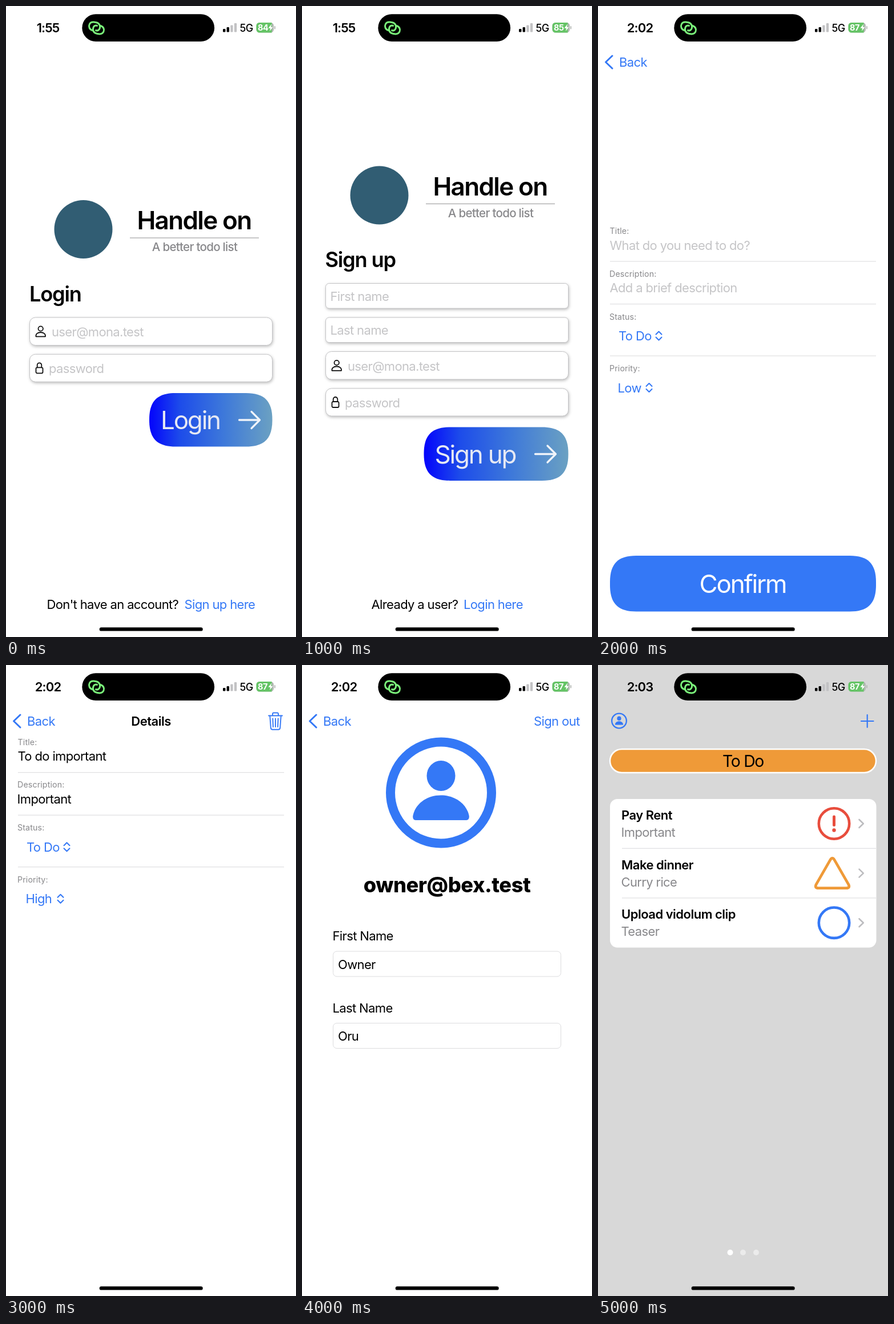
These frames come from a looping animation (508 px wide and 1102 px high, 6 s). An HTML page:

```html
<!DOCTYPE html>
<html lang="en">
<head>
<meta charset="utf-8">
<title>Todo app tour</title>
<style>
  html, body { margin: 0; width: 100%; height: 100%; overflow: hidden; background: #fff; }
  svg { display: block; width: 508px; height: 1102px; }
  text {
    font-family: Inter, "Liberation Sans", sans-serif;
    font-size: 22px; letter-spacing: -.029em; font-optical-sizing: none; white-space: pre;
  }
  .mid { text-anchor: middle; }
  .end { text-anchor: end; }
  .semi { font-weight: 600; letter-spacing: -.023em; }
  .time { font-weight: 600; letter-spacing: -.04em; }
  .brand { font-size: 44px; font-weight: 600; letter-spacing: -.037em; }
  .tag { font-size: 20.5px; font-weight: 500; letter-spacing: -.034em; }
  .head { font-size: 36.2px; font-weight: 600; letter-spacing: -.033em; }
  .mail { font-size: 36.2px; font-weight: 800; letter-spacing: -.012em; }
  .big { font-size: 44px; letter-spacing: -.05em; }
  .pill { font-size: 28.4px; letter-spacing: -.045em; }
  .label { font-size: 14.2px; letter-spacing: .01em; }
  .net { font-size: 18px; font-weight: 500; }
  .charge { font-size: 14.5px; font-weight: 700; }
  .blue { fill: #3478f6; }
  .gray { fill: #88888b; }
  .hint { fill: #c5c5c7; }
  .white { fill: #fff; }
  .pale { fill: #e6e9f4; }
  .line { fill: none; stroke-linecap: round; stroke-linejoin: round; }
  .raised { filter: drop-shadow(1px 2.5px 2.5px rgba(0, 0, 0, .26)); }
  .scene { visibility: hidden; animation: show 6s step-end infinite; }
  @keyframes show {
    0% { visibility: visible; }
    16.666%, 100% { visibility: hidden; }
  }
</style>
</head>
<body>
<svg id="stage" viewBox="0 0 508 1102">
  <defs>
    <linearGradient id="sea">
      <stop offset="0" stop-color="#0303fc"/>
      <stop offset=".25" stop-color="#1d4cea"/>
      <stop offset=".6" stop-color="#3d78da"/>
      <stop offset="1" stop-color="#6ba1c2"/>
    </linearGradient>
    <g id="person">
      <ellipse cy="-29.5" rx="25" ry="26.5"/>
      <path d="M-44.500 48C-48.500 48-50 44-49 39.500C-45.500 22-27.500 4.500 0 4.500S45.500 22 49 39.500C50 44 48.500 48 44.500 48Z"/>
    </g>
  </defs>
</svg>
<script>
const BLUE = '#3478f6', ORANGE = '#ef9a38', RED = '#e84d3d', RULE = '#dfdfe1';

const text = (x, y, s, cls = '') => `<text x="${x}" y="${y}" class="${cls}">${s}</text>`;
const rect = (x, y, w, h, r, fill, more = '') =>
  `<rect x="${x}" y="${y}" width="${w}" height="${h}" rx="${r}" fill="${fill}" ${more}/>`;
const dot = (x, y, r, fill, more = '') => `<circle cx="${x}" cy="${y}" r="${r}" fill="${fill}" ${more}/>`;
const line = (d, color, w) => `<path class="line" d="${d}" stroke="${color}" stroke-width="${w}"/>`;
const rule = (x, y) => rect(x, y - .6, 487 - x, 1.2, 0, RULE);
const at = (x, y, s) => `<g transform="translate(${x} ${y})">${s}</g>`;

// Rounded box with continuous corners
function squircle(x, y, w, h, fill, e = 46, c = 14) {
  const d = `M${x + e} ${y}h${w - 2 * e}c${e - c} 0 ${e} ${c} ${e} ${e}v${h - 2 * e}` +
    `c0 ${e - c} ${-c} ${e} ${-e} ${e}h${2 * e - w}c${c - e} 0 ${-e} ${-c} ${-e} ${-e}v${2 * e - h}` +
    `c0 ${c - e} ${c} ${-e} ${e} ${-e}Z`;
  return `<path d="${d}" fill="${fill}"/>`;
}

function statusBar(time, charge) {
  const link = 'M151.500 42.500C146 41 144.500 36 146 32.500C147.500 28.500 152 27.500 157 28.500' +
    'C163 29.500 166 34 164 39.500C163 42.500 160 43.500 157.500 42.500';
  const loop = line(link, '#7bf27b', 3);
  const bars = [5.5, 8.5, 12, 15.5].map((h, i) =>
    rect(380 + i * 6.6, 45.5 - h, 4.4, h, 1.2, i < 2 ? '#000' : '#c2c2c4')).join('');
  return rect(133.3, 14.3, 231.8, 47.7, 23.85, '#000') +
    loop + `<g transform="rotate(180 158.500 38.500)">${loop}</g>` +
    text(73.5, 45.5, time, 'mid time') + bars + text(409.5, 45, '5G', 'net') +
    rect(438.5, 29, 30.5, 17.5, 5.5, '#b4b8b4') +
    `<path d="M444 29H465.500V46.500H444A5.500 5.500 0 0 1 438.500 41V34.500A5.500 5.500 0 0 1 444 29Z" fill="#65c466"/>` +
    rect(470, 35, 1.8, 5.5, .9, '#b4b8b4') +
    text(441, 43, charge, 'charge white') +
    '<path d="M465 31.500L459.500 38.700H463L462 44L467.500 36.700H464Z" fill="#fff"/>';
}

const homeBar = rect(163.7, 1085.2, 181, 6.4, 3.2, '#000');

const logo = y => dot(135.5, y, 51, '#315d73') +
  text(329.5, y, 'Handle on', 'brand mid') +
  rect(217, y + 14.4, 226, 1.2, 0, '#a2a2a4') +
  text(330.5, y + 38, 'A better todo list', 'tag gray mid');

const field = (y, h, r) => rect(41.5, y, 425, h, r, '#fff', 'class="raised" stroke="#c4c4c6"');

const userField = y => field(y, 48.5, 10) +
  at(60.7, y + 24.5, line('M-8.200 8.800C-9 4 -5 1.500 0 1.500S9 4 8.200 8.800Z', '#111', 1.8) +
    dot(0, -5, 4.2, 'none', 'stroke="#111" stroke-width="1.800"')) +
  text(80, y + 33, 'user@mona.test', 'hint');

const passField = y => field(y, 48, 10) +
  at(58.5, y + 24, line('M-3.800-1V-5A3.800 4 0 0 1 3.800-5V-1', '#111', 1.8) +
    rect(-6, -1, 12, 10, 2, 'none', 'stroke="#111" stroke-width="1.800"')) +
  text(75, y + 32.5, 'password', 'hint');

const nameField = (y, hint) => field(y, 43.5, 6) + text(49.5, y + 30, hint, 'hint');

const goButton = (x, y, label, tx) => squircle(x, y, 466.5 - x, 93.5, 'url(#sea)') +
  text(tx, y + 63, label, 'big pale') +
  line(`M408.500 ${y + 47}H444.500M430 ${y + 32.5}L444.500 ${y + 47}L430 ${y + 61.5}`, '#f0f4fa', 3.3);

const back = line('M25 87L13.500 98L25 109', BLUE, 3) + text(37, 105.5, 'Back', 'blue');

const picker = (x, y, label, cx) => text(x, y, label, 'blue') +
  line(`M${cx - 5} ${y - 10.5}l5-5l5 5m0 5l-5 5l-5-5`, BLUE, 2);

const form = (y, title, note, cls, level, cx) => at(0, y,
  text(20.5, 0, 'Title:', 'label gray') + text(20.5, 27.5, title, cls) + rule(21, 48) +
  text(20, 74.5, 'Description:', 'label gray') + text(cls ? 20.5 : 19.5, 102, note, cls) + rule(21, 122.5) +
  text(20, 149.5, 'Status:', 'label gray') + picker(36, 186, 'To Do', 106.5) + rule(21, 213) +
  text(20, 240, 'Priority:', 'label gray') + picker(34.5, 276.5, level, cx));

const trash = line('M460 88.500H484M467 88V85.500Q467 83.500 469 83.500H475Q477 83.500 477 85.500V88' +
  'M462.300 89L463.800 109.500Q464 112.800 467 112.800H477Q480 112.800 480.200 109.500L481.700 89' +
  'M467.300 93.500L467.900 108M472 93.500V108M476.700 93.500L476.100 108', BLUE, 1.9);

const avatar = (x, y, scale) => `<g transform="translate(${x} ${y}) scale(${scale})" fill="${BLUE}">` +
  dot(0, 0, 88.5, 'none', `stroke="${BLUE}" stroke-width="16"`) + '<use href="#person"/></g>';

const entry = (y, label, value) => text(53.5, y, label) +
  rect(54.5, y + 19, 399, 44, 6.5, '#fff', 'stroke="#dcdcde"') + text(63, y + 49.5, value);

const ring = color => dot(413.5, 0, 26.7, 'none', `stroke="${color}" stroke-width="4.600"`);
const marks = [
  ring(RED) + line('M413.500-12V2.500', RED, 5) + dot(413.5, 11.5, 3.2, RED),
  line('M406.700-23Q410.500-29.500 414.300-23L438.800 19.500Q442 26 435 26H386Q379 26 382.200 19.500Z', ORANGE, 4.8),
  ring(BLUE)
];
const row = ([title, note], i) => at(0, 277 + i * 86.6,
  text(41, -7, title, 'semi') + text(40.5, 23.3, note, 'gray') + marks[i] +
  line('M457.500-7L464.800 0L457.500 7', '#bdbdc0', 2.6) + (i < 2 ? rule(42, 43.3) : ''));

const scenes = [
  ['1:55', 84, logo(390) + text(41, 516, 'Login', 'head') + userField(544) + passField(608.3) +
    goButton(251, 676, 'Login', 271) +
    text(71.5, 1053, 'Don\'t have an account?') + text(312.5, 1053, 'Sign up here', 'blue')],
  ['1:55', 85, logo(330.5) + text(40.5, 456, 'Sign up', 'head') +
    nameField(484.5, 'First name') + nameField(544, 'Last name') + userField(603.5) + passField(668) +
    goButton(213.5, 735.5, 'Sign up', 232.5) +
    text(121.5, 1053, 'Already a user?') + text(283, 1053, 'Login here', 'blue')],
  ['2:02', 87, back + form(398, 'What do you need to do?', 'Add a brief description', 'hint', 'Low', 89.5) +
    squircle(21, 960, 466, 97.5, BLUE) + text(253.5, 1025, 'Confirm', 'big white mid')],
  ['2:02', 87, back + text(254, 105.5, 'Details', 'semi mid') + trash +
    form(139.7, 'To do important', 'Important', '', 'High', 95.5)],
  ['2:02', 87, back + text(486.5, 106, 'Sign out', 'blue end') + avatar(243.5, 223, 1) +
    text(254, 396.5, 'owner@bex.test', 'mail mid') +
    entry(481, 'First Name', 'Owner') + entry(606.5, 'Last Name', 'Oru')],
  ['2:03', 87, avatar(37, 97.5, .145) + line('M461 98H482.500M471.700 87.200V108.800', BLUE, 2.2) +
    rect(21, 147, 466, 41, 20.5, ORANGE, 'stroke="#fff" stroke-width="2.500"') +
    text(254, 178, 'To Do', 'pill mid') + rect(21, 234, 466.5, 259.5, 13, '#fff') +
    [['Pay Rent', 'Important'], ['Make dinner', 'Curry rice'], ['Upload vidolum clip', 'Teaser']].map(row).join('') +
    [231.5, 254, 277].map((x, i) => dot(x, 1026, 5, i ? '#ebebeb' : '#fff')).join(''), '#d8d8d8']
];

document.getElementById('stage').insertAdjacentHTML('beforeend', scenes.map(([time, charge, body, bg = '#fff'], i) =>
  `<g class="scene" style="animation-delay:${i ? i - 6 : 0}s">` +
  rect(0, 0, 508, 1102, 0, bg) + statusBar(time, charge) + body + homeBar + '</g>').join(''));
</script>
</body>
</html>
```
